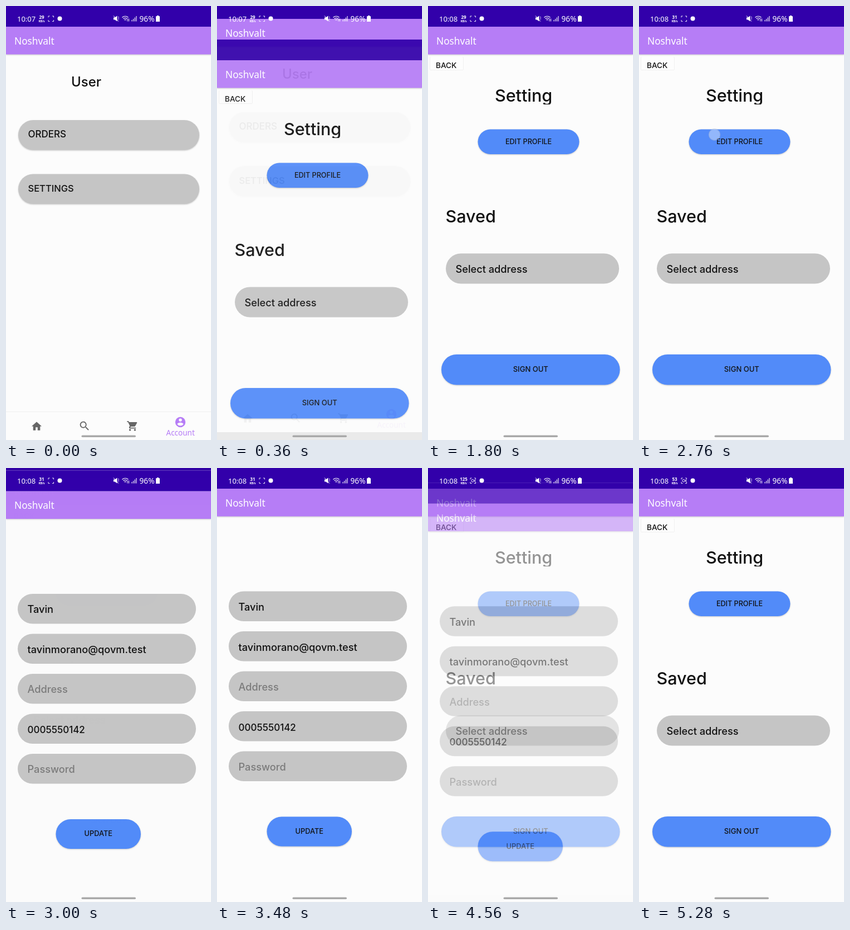
An HTML page that plays this animation: 368x776 px, repeating every 5.4 s.

```html
<!DOCTYPE html>
<html lang="en">
<head>
<meta charset="utf-8">
<title>Account screens</title>
<style>
  html, body { margin: 0; width: 100%; height: 100%; overflow: hidden; background: #000; }
  svg { display: block; }
  text { font-family: Inter, "Open Sans", sans-serif; font-weight: 500; fill: #111; white-space: pre; }
  .sys { font-family: "Noto Sans", "Open Sans", sans-serif; font-weight: 400; fill: #fff; }
  .raised { filter: drop-shadow(0 1px 1px #0003); }
  .flat { filter: drop-shadow(0 .5px .7px #0003); }
</style>
</head>
<body>
<svg id="stage" width="368" height="776" viewBox="0 0 368 776">
  <defs><clipPath id="cut"><rect x="110" y="140" width="130" height="36"/></clipPath></defs>
  <rect width="368" height="776"/>
  <g id="user"></g>
  <g id="settings"></g>
  <g id="profile"></g>
  <g fill="none" stroke="#fff">
    <text id="clock" class="sys" x="20" y="28" font-size="13" stroke="none"></text>
    <g stroke="none" text-anchor="middle">
      <text id="speed" class="sys" x="64" y="23" font-size="8" style="font-weight:700"></text>
      <text class="sys" x="64" y="28.5" font-size="5" style="font-weight:700">KB/s</text>
    </g>
    <path d="M76 20.5v-2.5h2.5M83 18h2.5v2.5M85.5 25v2.5h-2.5M78.5 27.5h-2.5v-2.5" stroke-width=".9"/>
    <g id="cam" stroke-width=".9"><circle cx="80" cy="22.7" r="2.2"/><path d="M82.5 22l2-1v3.5l-2-1"/></g>
    <circle cx="96.5" cy="22.5" r="4" fill="#fff" stroke="none"/>
    <path d="M193 20.5h2.5l4-3v10l-4-3h-2.5z" fill="#fff" stroke="none"/>
    <path d="M193 17.5l9 10M201 19.5l2 1M201 23h2" stroke-width="1"/>
    <path d="M208.5 20.5q5.5-4.5 11 0M210.5 22.8q3.5-3 7 0M212.5 25q1.5-1.3 3 0" stroke-width="1.2"/>
    <path d="M218 22.5v5M220.5 22.5v5" stroke-width="1"/>
    <path d="M226 27.5v-2.5M228.7 27.5v-4.5M231.4 27.5v-7M234 27.5v-9.5" stroke-width="1.1"/>
    <text class="sys" x="239.5" y="28" font-size="13.7" stroke="none">96%</text>
    <path d="M271 17h3v1.3h2v9.7h-7v-9.7h2z" fill="#fff" stroke="none"/>
  </g>
  <rect x="135.5" y="767.5" width="97.5" height="3.5" rx="1.75" fill="#a9a9a9"/>
  <circle id="touch" r="10" fill="#fff" fill-opacity=".38" stroke="#a0b4dc" stroke-opacity=".5" stroke-width="1.5"/>
</svg>
<script>
const $ = id => document.getElementById(id);
const GREY = '#c5c5c5', BLUE = '#528bf9', LILAC = '#b67df6', HINT = '#7b7b7b';
const LOOP = 5400, TICK = 120;

const label = (s, x, y, size, extra = '') =>
  `<text x="${x}" y="${y}" font-size="${size}" ${extra}>${s}</text>`;
const pill = (x, y, w, h, fill, raised) =>
  `<rect x="${x}" y="${y}" width="${w}" height="${h}" rx="${h / 2}" fill="${fill}" ${raised ? 'class="raised"' : ''}/>`;
const button = (s, x, y, w, h, size) =>
  pill(x, y, w, h, BLUE, true) +
  label(s, x + w / 2, y + h / 2 + 4, size, 'text-anchor="middle"');
const icon = (d, x, y, scale, fill) =>
  `<path d="${d}" fill="${fill}" fill-rule="evenodd" transform="translate(${x} ${y}) scale(${scale}) translate(-12 -12)"/>`;

const page = body => `
  <rect width="368" height="776" fill="#fcfcfc"/>
  <rect y="37" width="368" height="49.5" fill="${LILAC}" class="raised"/>
  <rect width="368" height="37" fill="#3200aa"/>
  ${label('Noshvalt', 15, 69, 17.3, 'class="sys"')}${body}`;

const home = 'M10 20v-6h4v6h5v-8h3L12 3 2 12h3v8z';
const lens = 'M15.5 14h-.8l-.3-.3a6.5 6.5 0 1 0-.7.7l.3.3v.8l5 5 1.5-1.5zM9.5 14a4.5 4.5 0 1 1 0-9a4.5 4.5 0 0 1 0 9z';
const cart = 'M1 2v2h2l3.6 7.6-1.35 2.4C4.5 15.4 5.5 17 7 17h12v-2H7.4l1.1-2h7.45c.75 0 1.4-.4 1.75-1L21.3 5.5A1 1 0 0 0 20.4 4H5.2l-.9-2zM7 18a2 2 0 1 0 0 4a2 2 0 0 0 0-4zM17 18a2 2 0 1 0 0 4a2 2 0 0 0 0-4z';
const person = 'M12 2a10 10 0 1 0 0 20a10 10 0 0 0 0-20zM12 5a3 3 0 1 1 0 6a3 3 0 0 1 0-6zM12 19.2a7.2 7.2 0 0 1-6-3.2c0-2 4-3.1 6-3.1s6 1.1 6 3.1a7.2 7.2 0 0 1-6 3.2z';

$('user').innerHTML = page(
  label('User', 117, 144, 24) +
  pill(22, 204, 325, 53.5, GREY, true) + label('ORDERS', 39.5, 235, 17) +
  pill(22, 300.5, 325, 53.5, GREY, true) + label('SETTINGS', 39.5, 331.5, 16.5) +
  '<path d="M0 725.5h368" stroke="#efefef"/>' +
  icon(home, 55, 751.5, .9, '#666') +
  icon(lens, 141, 751, .92, '#666') +
  icon(cart, 227, 751, .88, '#666') +
  icon(person, 313, 744, .92, LILAC) +
  label('Account', 287.5, 767.5, 13.5, `class="sys" style="fill:${LILAC}"`));

$('settings').innerHTML = page(
  '<rect x="3.5" y="91" width="60" height="23.5" rx="1.5" fill="#fdfdfd" class="flat"/>' +
  label('BACK', 14, 110.5, 13.6) +
  label('Setting', 120, 170.5, 30.5, 'clip-path="url(#cut)"') +
  button('EDIT PROFILE', 89.5, 220.5, 182, 44.5, 12.6) +
  label('Saved', 31.5, 387, 30.5) +
  pill(32, 442.5, 311, 54, GREY) + label('Select address', 49.5, 477, 18.2) +
  button('SIGN OUT', 24, 623, 320.5, 54.5, 13));

const fields = [
  ['Tavin', 18.2], ['tavinmorano@qovm.test', 18.2], ['Address', 18.2, HINT],
  ['0005550142', 17], ['Password', 18.2, HINT]
];
$('profile').innerHTML = page(
  fields.map(([s, size, fill = '#111'], i) => {
    const y = 220.5 + i * 71.5;
    return pill(21, y, 320, 53.5, GREY) + label(s, 38.5, y + 34.5, size, `style="fill:${fill}"`);
  }).join('') +
  button('UPDATE', 89.5, 623.5, 152.5, 53, 12.8));

// From time: clock, network speed, recorder lens shown
const statuses = [
  [0, '10:07', '29', false], [600, '10:07', '29', true], [1560, '10:08', '29', false],
  [2160, '10:08', '31', false], [3720, '10:08', '125', true], [4920, '10:08', '53', true]
];
// From, until, x, y
const touches = [[120, 360, 67, 331], [2760, 2880, 135.5, 230], [4320, 4440, 307.5, 562]];

function place(id, y, alpha) {
  $(id).setAttribute('transform', `translate(0 ${y})`);
  $(id).setAttribute('opacity', alpha);
}

// The upper page glides up to rest while the lower one drifts away
function open(lower, upper, elapsed) {
  const y = 60 * Math.exp(-elapsed / 62);
  place(lower, y / 10 - 20, .82 + .18 * y / 60);
  place(upper, y, 1 - .07 * y / 60);
}

function draw(t) {
  place('user', 0, 1);
  place('settings', 0, 0);
  place('profile', 0, 0);
  if (t >= 360) open('user', 'settings', t - 360);
  if (t >= 2880 && t < 4440) open('settings', 'profile', t - 2839);
  if (t >= 4440) {
    const p = Math.min(1, (t - 4320) / 360);
    place('profile', 40 * p, 1 - p * p);
  }

  const [, clock, speed, cam] = statuses.filter(s => s[0] <= t).pop();
  $('clock').textContent = clock;
  $('speed').textContent = speed;
  $('cam').setAttribute('opacity', cam ? 1 : 0);

  const tap = touches.find(([from, until]) => t >= from && t < until);
  $('touch').setAttribute('opacity', tap ? 1 : 0);
  if (tap) $('touch').setAttribute('transform', `translate(${tap[2]} ${tap[3]})`);
}

const start = performance.now();
function loop() {
  const t = (performance.now() - start) % LOOP;
  draw(Math.floor(t / TICK) * TICK);
  requestAnimationFrame(loop);
}
loop();
</script>
</body>
</html>
```
